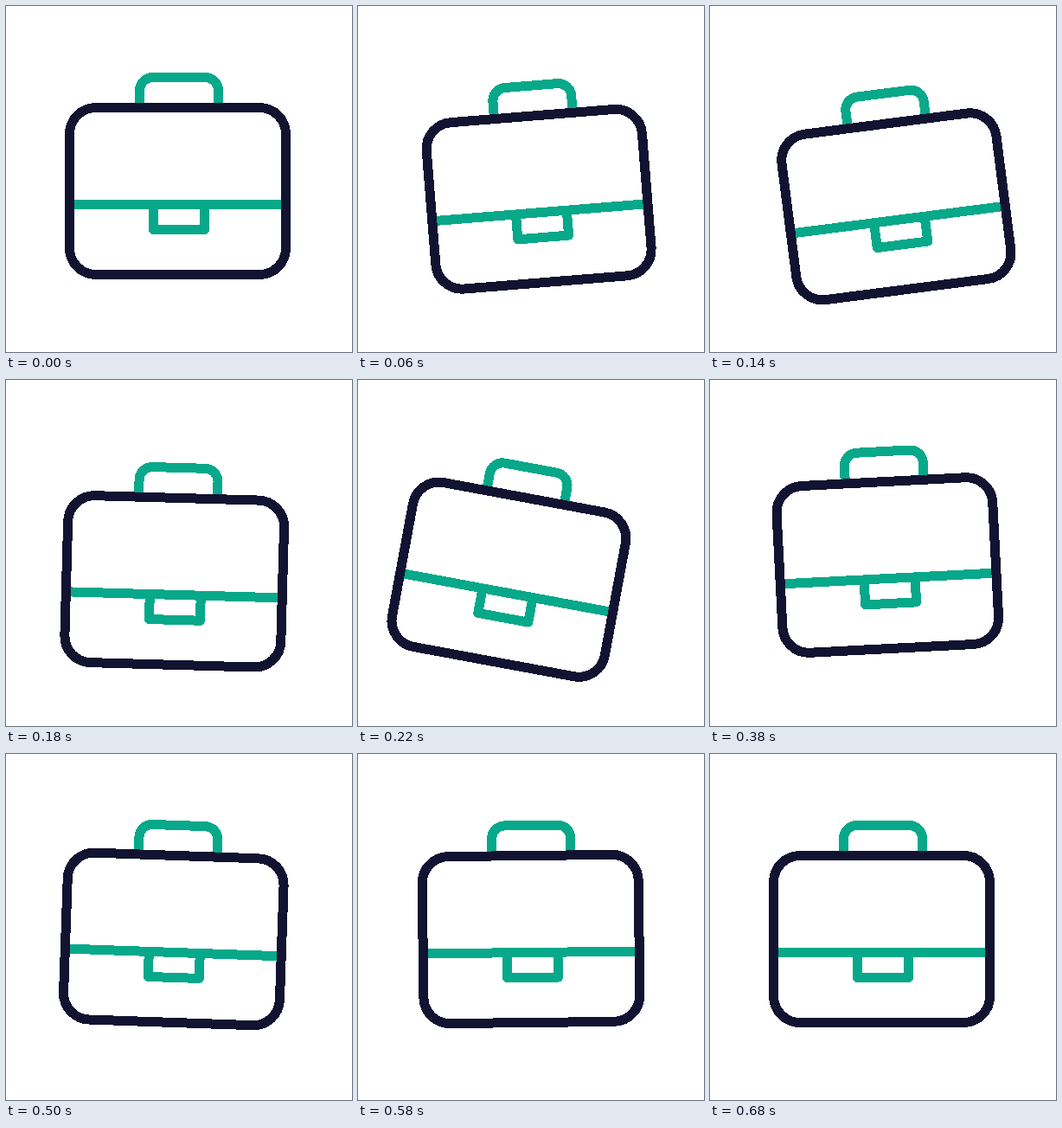
An HTML page for the animation above (700 ms loop, 400 by 400 pixels).

```html
<!DOCTYPE html>
<html lang="en">
<head>
<meta charset="utf-8">
<title>Swinging briefcase</title>
<style>
  html, body { margin: 0; width: 100%; height: 100%; overflow: hidden; background: #fff; }
  svg { display: block; width: 100%; height: 100%; }
</style>
</head>
<body>
<svg viewBox="0 0 400 400" shape-rendering="crispEdges">
  <g id="briefcase" fill="none" stroke-width="11" stroke-linejoin="round">
    <g stroke="#08a88a">
      <path d="M154.5 116V97.5a15 15 0 0 1 15-15h61a15 15 0 0 1 15 15V116"/>
      <path d="M75 229.5H322M170.5 229.5V258.5H229.5V229.5"/>
    </g>
    <rect x="73.5" y="117.5" width="250" height="193" rx="30.5" stroke="#121331"/>
  </g>
</svg>
<script>
  const LOOP = 700;
  const briefcase = document.getElementById('briefcase');

  // Smooth step from 0 to 1 between two times
  function ease(time, start, end) {
    const s = Math.min(1, Math.max(0, (time - start) / (end - start)));
    return s * s * (3 - 2 * s);
  }

  // Turning points of the swing: time in ms and angle in degrees
  const turns = [[120, -9], [241, 12], [386, -3], [490, 2.1], [600, -0.9], [690, 0]];

  function swing(time) {
    let start = 0, angle = 0;
    for (const [end, peak] of turns) {
      angle += (peak - angle) * ease(time, start, end);
      start = end;
    }
    return angle;
  }

  const drop = time => 18.9 * (ease(time, 0, 120) - ease(time, 268, 388));

  function draw() {
    const time = performance.now() % LOOP;
    briefcase.setAttribute('transform',
      `translate(0 ${drop(time)}) rotate(${swing(time)} 198.5 81.5)`);
    requestAnimationFrame(draw);
  }
  draw();
</script>
</body>
</html>
```
